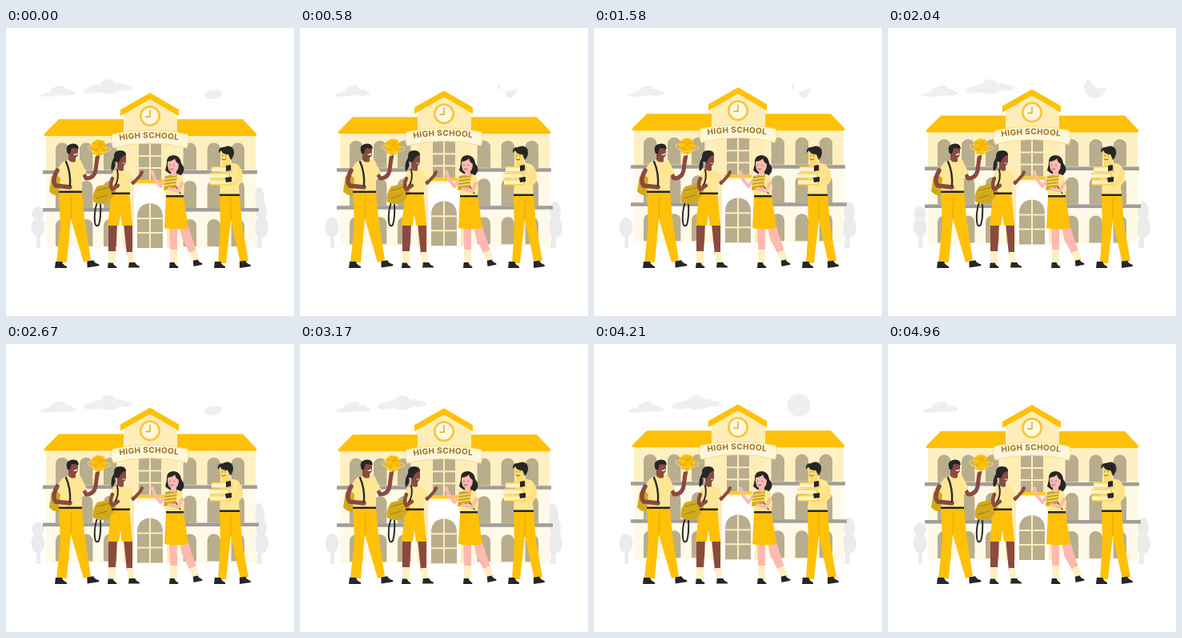
Animation, 360 px wide and 360 px high, one loop 5000 ms. Source, as an HTML page:

```html
<!DOCTYPE html>
<html lang="en">
<head>
<meta charset="utf-8">
<title>High school</title>
<style>
html, body { margin: 0; width: 100%; height: 100%; overflow: hidden; background: #fff; }
svg { display: block; width: 100vw; height: 100vh; }
.sky { fill: #efefef; }
.amber { fill: #ffc107; }
.shirt { fill: #ffe694; }
.cream { fill: #fff0c4; }
.dark { fill: #262626; }
.brown { fill: #8a4a40; }
.pink { fill: #ffb9b1; }
.gold { fill: #d2a91b; }
.glass { fill: #b8ad8d; }
.line { fill: none; stroke-linecap: round; stroke-linejoin: round; }
.strap { stroke: #2b2b2b; stroke-width: 1.6; }
.seam { stroke: #d99c00; stroke-width: .8; }
.sign { font: 700 10px Inter, "Open Sans", sans-serif; letter-spacing: .35px; fill: #9c711c; }

.float { animation: float 5s linear infinite; }
.ball { animation: ball 5s linear infinite; }
.head { transform-origin: 275px 172px; animation: tilt 5s linear infinite; }
.blink { animation: 5s step-end infinite; }
.cloud { animation-name: cloud; }
.low { animation-name: low; }
.crescent { animation-name: crescent; }
.bitten { animation-name: bitten; }
.disc { animation-name: disc; }
.crown { animation-name: crown; }
.leaf { animation-name: leaf; }

@keyframes float {
  0%, 60% { transform: translateY(0); }
  30%, 90% { transform: translateY(-7.2px); }
  100% { transform: translateY(-4.8px); }
}
@keyframes ball {
  0%, 60% { transform: translateY(0); }
  30%, 90% { transform: translateY(-2px); }
  100% { transform: translateY(-1.3px); }
}
@keyframes tilt {
  0% { transform: rotate(0); }
  7.5%, 37.5%, 67.5%, 97.5% { transform: rotate(2deg); }
  22.5%, 52.5%, 82.5% { transform: rotate(-4deg); }
  100% { transform: rotate(1deg); }
}
@keyframes cloud { 0%, 31.8% { opacity: 1; } 11.2%, 91.7%, 100% { opacity: 0; } }
@keyframes low { 0%, 47% { opacity: 1; } 11.2%, 63%, 100% { opacity: 0; } }
@keyframes crescent { 0%, 31.8%, 100% { opacity: 0; } 11.2% { opacity: 1; } }
@keyframes bitten { 0%, 47%, 100% { opacity: 0; } 31.8% { opacity: 1; } }
@keyframes disc { 0%, 91.7%, 100% { opacity: 0; } 78.4% { opacity: 1; } }
@keyframes crown { 0%, 47% { opacity: 1; } 11.2%, 78.4%, 100% { opacity: 0; } }
@keyframes leaf { 0%, 31.8%, 91.7% { opacity: 1; } 11.2%, 63% { opacity: 0; } 47%, 100% { opacity: 1; } }
</style>
</head>
<body>
<svg viewBox="0 0 360 360">
  <defs>
    <path id="arch" class="glass" d="M0 34V8A8.2 8 0 0 1 16.4 8V34Z"/>
    <path id="shoe" class="dark" d="M1 0H9Q10 4 15 6V8H0Z"/>
    <path id="arc" d="M142 140.5Q180 134.5 219 140.5"/>
  </defs>

  <g class="sky">
    <path d="M43 85Q44 81 54 80Q58 73 67 72Q73 71 75 77Q80 75 83 79Q88 80 87 83Q80 86 70 84Q55 87 43 85Z"/>
    <path class="blink cloud" d="M97 80Q98 73 108 73Q112 69 117 71Q120 64 129 64Q136 65 138 70Q144 67 148 71Q158 71 158 76Q153 79 142 78Q138 83 124 82Q118 79 112 81Q104 83 97 80Z"/>
    <path class="blink low" d="M248 84Q249 79 257 78Q266 76 270 79Q270 89 258 89Q250 89 248 84Z"/>
    <path class="blink crescent" d="M271 74A14 14 0 0 1 261 88Q256 84 257 79Q266 79 271 74ZM248 69L251 73L249 78L247 74Z"/>
    <path class="blink bitten" d="M249 65Q243 71 246 80A14 14 0 0 0 272 78L271 74Q263 77 258 73Q254 70 254 66Z"/>
    <circle class="blink disc" cx="256" cy="76.5" r="14.3"/>
  </g>

  <g fill="#ebebeb">
    <path d="M39 240H42L43 275H38Z"/>
    <ellipse cx="40" cy="249" rx="8.5" ry="12"/>
    <ellipse class="blink leaf" cx="40" cy="232" rx="7.5" ry="9"/>
    <path d="M316 240H319L320 275H313Z"/>
    <ellipse cx="319" cy="249" rx="9" ry="13"/>
    <ellipse cx="319" cy="229" rx="7" ry="12"/>
    <ellipse class="blink crown" cx="316" cy="215" rx="7" ry="16"/>
  </g>

  <g class="float">
    <path class="cream" d="M50 134H312V180H50Z"/>
    <path fill="#fff9e7" d="M50 180H312V275H50Z"/>
    <g id="windows"></g>
    <path fill="#a19e99" d="M46 178H314V182.5H46ZM46 225H316V229.5H46Z"/>
    <path class="amber" d="M66 114H296L313 132V135H48V132Z"/>
    <path fill="#ffedb8" d="M147 105L180 88L214 105V275H147Z"/>
    <path fill="#fff9e8" d="M153 275V195H208V275Z"/>
    <path fill="#ffecb3" d="M152 197H160V275H152ZM201 197H209V275H201Z"/>
    <path fill="#fff" d="M160 275V213Q162 198 180 197Q199 198 201 213V275Z"/>
    <path class="amber" d="M180 81L216 102V110L180 89L143 110V102Z"/>
    <circle cx="180" cy="110" r="11.7" fill="#fff8df" stroke="#fac440" stroke-width="2.7"/>
    <path class="line" d="M180 103V111H175" stroke="#e0a72b" stroke-width="1.5"/>
    <path class="glass" d="M166 144H194V190H166ZM164 275V235Q165 220 180 219Q195 220 196 235V275Z"/>
    <path class="line" d="M180 144V190M166 160H194M166 175H194M180 219V275M164 238H196M164 256H196" stroke="#ffedb8" stroke-width="2"/>
    <path class="amber" d="M163 190H197V194H163Z" opacity=".8"/>
    <path d="M133 133Q180 122 227 133Q230 141 226 150Q180 138 134 150Q130 141 133 133Z" fill="#fff7dc" stroke="#ffdc78" stroke-width="1"/>
    <text class="sign"><textPath href="#arc">HIGH SCHOOL</textPath></text>
  </g>

  <!-- student with the ball -->
  <g>
    <path class="gold" d="M57 185Q68 179 72 192L69 209Q59 211 54 204Z"/>
    <path class="amber" d="M66 204H95L98 238L106 290L97 293L81 238L76 293H63L68 246Z"/>
    <path class="line seam" d="M82 212L81 238"/>
    <use href="#shoe" x="61" y="292"/>
    <use href="#shoe" x="101" y="290.5" transform="rotate(-9 108 295)"/>
    <path class="line" d="M95 178L100 188Q110 188 112 178L114 162" stroke="#8a4a40" stroke-width="5"/>
    <path class="line" d="M114 169L116 160" stroke="#8a4a40" stroke-width="2.5"/>
    <path class="shirt" d="M70 168Q82 161 93 165L101 181L95 185V205H66L68 188L61 181Z"/>
    <path class="line" d="M64 178Q57 191 62 197L80 199" stroke="#8a4a40" stroke-width="5.5"/>
    <path class="line strap" d="M75 167Q81 180 80 197" style="stroke-width:2.4"/>
    <path class="dark" d="M66 203.5H95V206H66Z"/>
    <path class="brown" d="M78 157H87V167Q81 169 78 165Z"/>
    <path class="brown" d="M78 149H90V158Q88 164 83 163Q78 161 78 149Z"/>
    <path class="dark" d="M77 157Q73 147 81 145Q90 143 91 151L82 150L80 157Z"/>
    <path class="line" d="M85 158Q87 159 89 157" stroke="#fff" stroke-width="1.2"/>
  </g>
  <g class="ball">
    <circle class="amber" cx="116" cy="149.5" r="10"/>
    <path class="line seam" d="M108 144Q118 144 124 155M110 157Q115 150 121 141M107 152Q113 150 117 159M114 140Q116 147 125 147"/>
    <path class="line" d="M108 147Q99 147 104 152Q116 160 130 153Q133 150 125 149" stroke="#f5d37a" stroke-width="1.1"/>
  </g>

  <!-- student with the shoulder bag -->
  <g>
    <path class="brown" d="M128 244H139L137 282H128ZM147 244H158V266L158 283H151Z"/>
    <path class="cream" d="M127.5 279H137V295H128ZM151 280H159L160 295H153Z"/>
    <use href="#shoe" transform="translate(127 293.5) scale(.75 .8)"/>
    <use href="#shoe" transform="translate(153 293) scale(.93 .8)"/>
    <path class="amber" d="M132 205H154L158 247H145L143 233L141 247H127Z"/>
    <path class="line" d="M154 185L159 194L168 184L170 180" stroke="#8a4a40" stroke-width="4"/>
    <path class="shirt" d="M134 179Q145 173 155 180L159 190L155 194V207H132L131 189Z"/>
    <path class="line strap" d="M139 177Q142 190 135 199M118 218Q119 237 116 246Q112 250 111 242Q110 229 114 218" style="stroke-width:2"/>
    <path class="gold" d="M114 198L131 194Q138 199 137 207L128 218Q117 223 109 217Q107 207 114 198Z"/>
    <path class="line" d="M114 203L130 199M113 213L126 209" stroke="#9e7d14" stroke-width="1"/>
    <path class="line" d="M133 188Q129 197 133 202L140 197" stroke="#8a4a40" stroke-width="4.5"/>
    <path class="dark" d="M132 205.5H155V208H132Z"/>
    <path class="brown" d="M139 168H147V178Q142 180 139 176Z"/>
    <path class="brown" d="M138 157H150V168Q148 174 144 172Q138 169 138 157Z"/>
    <path class="dark" d="M135 162Q134 153 143 153Q150 153 150 159Q144 159 141 168L136 167Q138 175 132 179Q130 170 135 162Z"/>
    <path class="line" d="M146 169H149" stroke="#ffd6c8" stroke-width="1"/>
  </g>

  <!-- student with notebooks -->
  <g>
    <path class="pink" d="M204 248H214V294H206ZM217 248H228L241 288L235 293L220 263Z"/>
    <path class="cream" d="M205 277H214V294H206ZM229 281L238 277L242 290L235 293Z"/>
    <use href="#shoe" transform="translate(204 293) scale(.75 .88)"/>
    <use href="#shoe" transform="translate(233 291) rotate(-12) scale(.75 .9)"/>
    <path class="amber" d="M200 210H222L228 250Q213 253 198 250Z"/>
    <path class="line" d="M199 190L193 198L186 189L183 180" stroke="#ffb9b1" stroke-width="4"/>
    <path class="dark" d="M201 170Q200 159 210 159Q218 160 219 169Q226 177 219 184Q209 187 199 178Z"/>
    <path class="shirt" d="M202 185Q212 179 220 185L223 198L222 211H200L197 195Z"/>
    <path class="line strap" d="M204 185L218 207" style="stroke-width:1.2"/>
    <path class="gold" d="M199 185L214 183L212 200L197 203Z"/>
    <path class="line" d="M199 189L213 187M198 193L213 191M198 197L212 195" stroke="#fff0be" stroke-width="1"/>
    <path class="line" d="M220 194L215 204L204 201" stroke="#ffb9b1" stroke-width="4"/>
    <path class="dark" d="M200 209H222V211.5H200Z"/>
    <path class="pink" d="M206 177H213V184Q209 187 206 183Z"/>
    <path class="pink" d="M202 167Q209 166 211 163Q212 168 216 170Q216 181 208 181Q201 179 202 167Z"/>
    <path class="line" d="M205 176Q207 178 209 176M205 171V172M210 171V172" stroke="#61443e" stroke-width=".8"/>
  </g>

  <!-- student with a pile of books -->
  <g>
    <path class="amber" d="M267 207H292L295 246L303 291L293 294L281 240L275 294H265L268 247Z"/>
    <path class="line seam" d="M281 213V238"/>
    <use href="#shoe" transform="translate(274 292) scale(-1 1)" style="display:none"/>
    <use href="#shoe" transform="translate(260 292) scale(.93 1)"/>
    <use href="#shoe" transform="translate(291 292) rotate(-8) scale(.93 1)"/>
    <path class="shirt" d="M269 172Q281 166 290 171Q297 179 296 191L291 197L292 209H267Z"/>
    <g class="head">
      <path fill="#ffd965" d="M270 165H280V173Q274 176 270 172Z"/>
      <path fill="#ffdc70" d="M268 154H281V164Q278 171 272 169Q267 166 268 154Z"/>
      <path class="dark" d="M266 156Q265 149 272 149Q280 145 284 151Q287 158 281 165L278 158Q270 158 269 153Z"/>
      <path class="line" d="M270 164Q272 166 275 164M271 159V160M275 159V160" stroke="#604b1b" stroke-width=".9"/>
    </g>
    <path class="line" d="M292 179Q295 193 280 195" stroke="#ffe083" stroke-width="6"/>
    <g id="books"></g>
    <path class="dark" d="M275 172L281 171V178L275 179ZM274 187L282 186V192L275 193Z"/>
    <path class="dark" d="M267 207.5H292V210H267Z"/>
  </g>
</svg>
<script>
const add = (id, tag, attrs) => {
  const el = document.createElementNS("http://www.w3.org/2000/svg", tag);
  for (const key in attrs) el.setAttribute(key, attrs[key]);
  document.getElementById(id).append(el);
};
for (const y of [143.5, 191, 239])
  for (const x of [62, 92, 122, 221.6, 251.6, 281.6])
    add("windows", "use", { href: "#arch", x, y });
for (const [x, y] of [[257, 173], [254, 181], [255, 189]]) {
  add("books", "rect", { x, y, width: 26, height: 7.5, rx: 1, fill: "#ffd34f" });
  add("books", "rect", { x, y: y + 1.5, width: 24, height: 4.5, fill: "#fff2c5" });
}
</script>
</body>
</html>
```
